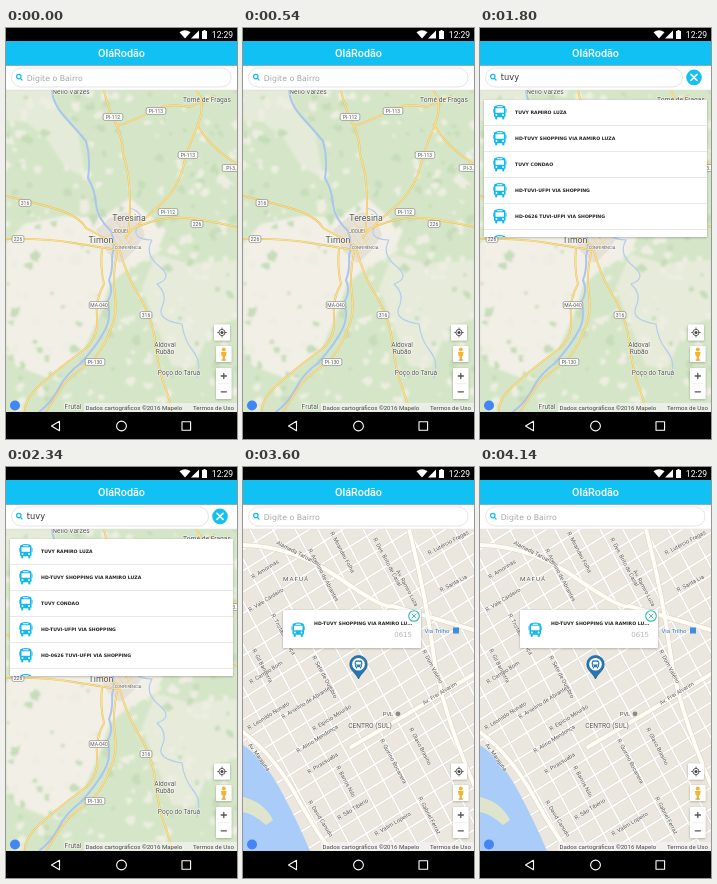
Recreate the animation shown at these times as an HTML page. Size 231 by 411 pixels, loop 4500 ms.

```html
<!DOCTYPE html>
<html lang="pt">
<head>
<meta charset="utf-8">
<title>Linhas de ônibus</title>
<style>
html, body { margin: 0; width: 100%; height: 100%; overflow: hidden; background: #000; }
svg { display: block; width: 100%; height: 100%; }
text { font-family: Roboto, Arial, sans-serif; }
.wide { font-family: "DejaVu Sans", Verdana, sans-serif; }
.row { font: bold 4.65px "DejaVu Sans", Verdana, sans-serif; fill: #222; }
.place { fill: #55534e; paint-order: stroke; stroke: #fffc; stroke-width: 1.2px; stroke-linejoin: round; }
.street { font-size: 5.7px; fill: #55524d; paint-order: stroke; stroke: #fffb; stroke-width: 1px; }
.line { fill: none; stroke-linecap: round; stroke-linejoin: round; }
.city, .zoom, .all, .found, .picked, .idle, .typed { animation: 4500ms step-end infinite; }
.city { animation-name: city; }
.zoom { animation-name: zoom; }
.all { animation-name: all; }
.found, .typed { animation-name: found; }
.idle { animation-name: idle; }
.picked { animation-name: picked; }
@keyframes city { 0% { opacity: 1 } 80%, 100% { opacity: 0 } }
@keyframes zoom { 0% { opacity: 0 } 80%, 100% { opacity: 1 } }
@keyframes all { 0% { opacity: 0 } 20% { opacity: 1 } 40%, 100% { opacity: 0 } }
@keyframes found { 0% { opacity: 0 } 40% { opacity: 1 } 80%, 100% { opacity: 0 } }
@keyframes idle { 0% { opacity: 1 } 40% { opacity: 0 } 80%, 100% { opacity: 1 } }
@keyframes picked { 0% { opacity: 0 } 60% { opacity: 1 } 80%, 100% { opacity: 0 } }
</style>
</head>
<body>
<svg viewBox="0 0 231 411" preserveAspectRatio="none">
  <defs>
    <clipPath id="map"><rect y="62" width="231" height="322"/></clipPath>
    <clipPath id="panel"><rect x="4" y="72" width="223" height="137"/></clipPath>
    <filter id="shade" x="-10%" y="-10%" width="120%" height="130%">
      <feDropShadow dx="0" dy=".7" stdDeviation=".9" flood-opacity=".28"/>
    </filter>
    <filter id="soft"><feGaussianBlur stdDeviation="1"/></filter>
    <symbol id="bus" viewBox="0 0 14 15" overflow="visible">
      <path fill="currentColor" d="M2 1Q7-1 12 1Q13 1.5 13 3V12.2H11.8V14Q11.8 15 10.7 15T9.6 14V12.7H4.4V14Q4.4 15 3.3 15T2.2 14V12.2H1V3Q1 1.5 2 1ZM0 4H.7V8H0ZM13.3 4H14V8H13.3Z"/>
      <path fill="#fff" d="M4.3 1.4H9.7V2.3H4.3ZM2.6 3.4H11.4V7.9H2.6Z"/>
      <circle cx="3.6" cy="10.4" r="1" fill="#fff"/><circle cx="10.4" cy="10.4" r="1" fill="#fff"/>
    </symbol>
  </defs>

  <g clip-path="url(#map)">
    <g class="city" id="city"></g>
    <g class="zoom" id="zoom"></g>
    <path d="M78 375H231V384H78Z" fill="#f5f5f5" opacity=".68"/>
    <g font-size="6.1" fill="#444">
      <text x="79.5" y="382.3">Dados cartográficos ©2016 Mapelo</text>
      <text x="187" y="382.3">Termos de Uso</text>
    </g>
    <circle cx="9" cy="377.5" r="5" fill="#4285f4"/>
    <g filter="url(#shade)" fill="#fff">
      <rect x="208" y="296.5" width="16" height="16" rx="1"/>
      <rect x="210" y="318" width="15.5" height="16" rx="1"/>
      <rect x="210" y="340" width="15.5" height="31" rx="1"/>
    </g>
    <g class="line" stroke="#555">
      <circle cx="216" cy="304.5" r="3.1"/>
      <path d="M216 300V301M216 308V309M211.7 304.5H212.7M219.3 304.5H220.3" stroke-width=".9"/>
      <path d="M215.2 348H220.4M217.8 345.4V350.6M215.2 363.8H220.4" stroke-width="1.3"/>
      <path d="M212.5 355.7H223" stroke="#e4e4e4" stroke-width=".6"/>
    </g>
    <circle cx="216" cy="304.5" r="1.5" fill="#444"/>
    <circle cx="217.8" cy="321.6" r="2" fill="#f6b330"/>
    <path d="M215 324H220.6L220 328H219.2L218.8 331.6H216.8L216.4 328H215.5Z" fill="#f6b330"/>
    <ellipse cx="217.8" cy="332" rx="2.6" ry=".7" fill="#c49a45"/>
  </g>

  <g class="all" id="all"></g>
  <g class="found" id="found"></g>

  <g class="zoom">
    <rect x="40" y="143" width="138" height="38" rx="1" fill="#fff" filter="url(#shade)"/>
    <use href="#bus" x="48.5" y="155.5" width="13.5" height="14.5" color="#11b9ee"/>
    <text class="row" x="71" y="158">HD-TUVY SHOPPING VIA RAMIRO LU...</text>
    <text class="wide" x="169" y="170" text-anchor="end" font-size="7" fill="#b5b5b5">0615</text>
    <circle cx="171" cy="149" r="5.3" fill="#fff" stroke="#35b8ae" stroke-width="1.1"/>
    <path class="line" d="M169 147L173 151M173 147L169 151" stroke="#35b8ae" stroke-width=".9"/>
    <path d="M115.5 212C113 206 106.8 203.5 106.8 197.2A8.7 8.7 0 0 1 124.2 197.2C124.2 203.5 118 206 115.5 212Z" fill="#2477b3" stroke="#17598c" stroke-width=".7"/>
    <circle cx="115.5" cy="197.2" r="6.3" fill="#fff"/>
    <use href="#bus" x="111.5" y="193" width="8" height="8.5" color="#2477b3"/>
  </g>

  <rect width="231" height="13" fill="#000"/>
  <rect y="13" width="231" height="24.5" fill="#11c1f3"/>
  <rect y="37.5" width="231" height="24.5" fill="#fff"/>
  <path d="M0 62H231" stroke="#ddd" stroke-width=".5"/>
  <text x="115.5" y="28.6" text-anchor="middle" font-size="10.8" font-weight="500" fill="#fff">OláRodão</text>

  <g class="idle">
    <rect x="5.5" y="40" width="219.5" height="19" rx="9.5" fill="#fff" stroke="#ddd" stroke-width=".8"/>
    <text class="wide" x="20.8" y="52.6" font-size="7.8" fill="#a4a4a4">Digite o Bairro</text>
  </g>
  <g class="typed">
    <rect x="5.5" y="40" width="197" height="19" rx="9.5" fill="#fff" stroke="#ddd" stroke-width=".8"/>
    <text class="wide" x="20.8" y="52.4" font-size="8.3" fill="#333">tuvy</text>
    <circle cx="214" cy="49.4" r="7.8" fill="#11c1f3"/>
    <path class="line" d="M211 46.4L217 52.4M217 46.4L211 52.4" stroke="#fff" stroke-width="1.6"/>
  </g>
  <g class="line" stroke="#11b9ee" stroke-width="1.2">
    <circle cx="12.8" cy="48.6" r="2.2"/><path d="M14.5 50.4L16 52"/>
  </g>

  <g fill="#fff">
    <path d="M173.5 4.2Q179 .5 184.5 4.2L179 10.6Z"/>
    <path d="M185 10.5H193V2.5Z"/>
    <path d="M196 3H197.5V2H199.5V3H201V11H196Z"/>
    <text x="205.8" y="9.8" font-size="8.6">12:29</text>
  </g>

  <rect y="384.5" width="231" height="26.5" fill="#000"/>
  <g class="line" stroke="#fff" stroke-width="1.1">
    <path d="M45.5 398L53.5 393.3V402.7Z"/>
    <circle cx="115.5" cy="398" r="4.9"/>
    <rect x="176" y="393.7" width="8.6" height="8.6"/>
  </g>
</svg>
<script>
const put = (id, parts) => { document.getElementById(id).innerHTML = parts.flat().join(''); };
const line = (d, color, width) => `<path class="line" d="${d}" stroke="${color}" stroke-width="${width}"/>`;
const fill = (d, color) => `<path d="${d}" fill="${color}"/>`;
const place = (s, x, y, size, extra = '') =>
  `<text class="place" text-anchor="middle" x="${x}" y="${y}" font-size="${size}" ${extra}>${s}</text>`;
const street = ([s, x, y, turn]) =>
  `<text class="street" transform="translate(${x} ${y}) rotate(${turn})">${s}</text>`;

let seed = 17;
const rnd = () => (seed = (seed * 16807) % 2147483647) / 2147483647;

// Regional map
function blob(color, x, y, r) {
  const pts = Array.from({ length: 8 }, (_, i) => {
    const a = i * Math.PI / 4, k = r * (0.45 + rnd());
    return `${(x + k * Math.cos(a)).toFixed(1)} ${(y + k * Math.sin(a)).toFixed(1)}`;
  });
  return fill(`M${pts.join('L')}Z`, color);
}
const speckle = (n, color, size) => Array.from({ length: n }, () =>
  blob(color, rnd() * 231, 62 + rnd() * 322, 1 + rnd() * size));

function badge(s, x, y) {
  const w = s.length * 2.6 + 4;
  return `<rect x="${x - w / 2}" y="${y - 3.4}" width="${w}" height="6.8" rx="1.5" fill="#fff" stroke="#77766f" stroke-width=".6"/>
    <text x="${x}" y="${y + 1.8}" text-anchor="middle" font-size="5" fill="#555">${s}</text>`;
}

const rivers = [
  'M46 62Q47 76 58 88T80 113Q85 130 82 150Q89 162 90 176T105 203Q110 216 106 228Q107 242 103 252Q108 264 101 274Q106 288 99 302T75 335Q60 346 53 360T33 384',
];
const creek = 'M124 180Q140 185 132 198T146 212Q138 226 153 238T151 256Q162 266 156 279T176 296Q178 312 187 323T191 350';
const roads = [
  'M98 62Q101 78 109 94T117 126Q124 146 124 174T120 210',
  'M111 98Q130 92 146 83T184 79L208 68',
  'M190 62Q201 75 191 99T179 132Q173 160 155 176T122 206',
  'M191 96Q203 119 231 136',
  'M0 168Q27 174 50 181T80 200L113 218',
  'M0 211Q38 210 68 215T112 222',
  'M122 203Q144 192 164 190T231 199',
  'M113 220Q121 249 132 266T148 305Q152 340 158 356T166 384',
  'M96 220Q94 240 98 256Q89 271 91 291T75 324Q48 344 33 358T19 384',
  'M111 225Q106 248 109 267T104 303Q94 329 78 339T52 365L40 384',
];

put('city', [
  fill('M0 62H231V384H0Z', '#d5e6c8'),
  '<g filter="url(#soft)">',
  fill('M0 62H47L52 82L72 104L80 150L60 140L40 110L20 94L0 92Z', '#e4ebd8'),
  fill('M18 196L58 188L96 190L124 170L142 186L160 202L150 226L120 242L104 256L94 286L78 322L42 350L10 338L0 316V216Z', '#f1efe6'),
  fill('M150 226L184 236L231 232V290L205 300L188 340L166 338L150 296L136 260Z', '#e6ebda'),
  speckle(190, '#edeee1', 4.3),
  speckle(110, '#c7ddba', 4),
  '</g>',
  fill('M90 202L104 190L120 184L134 193L139 207L127 224L114 235L101 224Z', '#e6e1d8'),
  rivers.map(d => line(d, '#a9c6ef', 2)),
  line(creek, '#b3cdee', 1.2),
  roads.map(d => line(d, '#e3bd62', 1.9)),
  roads.map(d => line(d, '#fbe08d', 1.2)),
  ['M98 210L118 199L126 211L113 222Z', 'M104 198L119 219', 'M111 194L124 216'].map(d => line(d, '#f5d781', 0.8)),
  badge('PI-112', 107, 89), badge('PI-113', 150, 83), badge('PI-113', 182, 127),
  badge('PI-3..', 226, 140), badge('PI-112', 162, 184), badge('316', 19, 175),
  badge('226', 12, 211), badge('226', 191, 196), badge('316', 140, 287),
  badge('MA-040', 93, 277), badge('PI-130', 89, 334),
  place('Nélio Varzes', 65, 66, 6.7),
  place('Tomé de Fragas', 201, 74, 6.7),
  place('Teresina', 123, 193, 8.8),
  place('Timon', 95, 215, 8.8),
  place('JÓQUEI', 114, 205, 4.6),
  place('CONFERÊNCIA', 122, 221, 4),
  place('Aldoval', 159, 318.5, 6.6), place('Rubão', 159, 325.5, 6.6),
  place('Poço do Taruá', 173, 347, 6.6),
  place('Frutal', 67, 381, 6.6),
]);

// Street map
const grid = (count, gap, turn, color, width) => `<g transform="translate(115 223) rotate(${turn})">` +
  Array.from({ length: count }, (_, i) => {
    const y = (i - (count - 1) / 2) * gap;
    return line(`M-240 ${y}H240`, color, width);
  }).join('') + '</g>';
const avenues = [
  'M0 78Q50 79 96 111T149 139L231 163',
  'M108 280Q167 246 231 207',
  'M0 265Q30 287 54 330T89 384',
  'M166 62Q183 130 190 184T231 318',
];
const names = [
  ['Alameda Taruanã', 33, 77, 27], ['R. Amorinas', 10, 112, -32],
  ['R. Mirandeu Folha', 87, 66, 62], ['R. Lutércio Fragas', 186, 88, -28],
  ['R. Vale Cardeiro', 7, 145, -32], ['R. Des. Brito de Casal', 130, 72, 62],
  ['R. Arvelino de Abrantes', 65, 83, 62], ['Av. Ramiro Luza', 153, 104, 62],
  ['R. Gil Bandurra', 9, 183, 62], ['R. Sete de Outubro', 69, 190, 62],
  ['R. Tristão Valença', 28, 148, 62], ['R. Campo Bom', 8, 217, -32],
  ['R. Leonildo Nonato', 6, 263, -32], ['R. Arvelino de Abrantes', 40, 252, -32],
  ['R. Elpício Mourão', 71, 264, -32], ['R. Alírio Mendonça', 55, 286, -32],
  ['R. Pirassuaba', 66, 307, -32], ['Av. Marajuna', 5, 278, 54],
  ['R. Quirino Bocanera', 137, 273, 62], ['Av. Frei Alvarim', 181, 238, -31],
  ['R. São Tibério', 96, 353, -32], ['R. Barros Nilo', 93, 300, 62],
  ['R. Dom Valério', 179, 184, 62], ['R. Olavo Brasino', 166, 262, 62],
  ['R. Valim Lopeiro', 133, 369, -31], ['R. David Canudo', 65, 335, 58],
  ['R. Gabriel Ferraz', 175, 331, 62], ['R. Santa Lia', 198, 125, -28],
];

put('zoom', [
  fill('M0 62H231V384H0Z', '#ebe7de'),
  grid(27, 18, -32, '#d9d5cc', 2.4), grid(23, 20, 62, '#d9d5cc', 2.4),
  grid(27, 18, -32, '#fff', 1.7), grid(23, 20, 62, '#fff', 1.7),
  fill('M0 278Q20 291 37 322T67 384H0Z', '#a9cdf8'),
  fill('M0 330Q21 335 30 353L23 358Q11 347 0 345Z', '#dfe5cc'),
  avenues.map(d => line(d, '#d8d2c5', 5)),
  avenues.map(d => line(d, '#fffdf5', 4)),
  names.map(street),
  place('MAFUÁ', 53, 114, 6.2, 'letter-spacing="1"'),
  place('CENTRO (SUL)', 127, 261, 6.7),
  place('PVL', 145, 249, 5.8),
  '<circle cx="155" cy="246.8" r="2.4" fill="#8b8a85"/>',
  place('Via Trilho', 194, 165.5, 6, 'style="fill:#3b6fb5"'),
  '<rect x="210" y="160.5" width="6" height="6" fill="#3d8fdb"/>',
]);

// Result lists
function list(rows, mark = '') {
  const top = i => 71.5 + 26 * i;
  return ['<rect x="4" y="72" width="223" height="137" fill="#fff" filter="url(#shade)"/>',
    '<g clip-path="url(#panel)">', mark,
    rows.map((s, i) => `<use href="#bus" x="13" y="${top(i) + 5.5}" width="13.5" height="14.5" color="#11b9ee"/>
      <text class="row" x="35" y="${top(i) + 14.2}">${s}</text>
      <path d="M4 ${top(i + 1)}H227" stroke="#d9d9d9" stroke-width=".6"/>`),
    `<use href="#bus" x="13" y="${top(5) + 5.5}" width="13.5" height="14.5" color="#11b9ee"/></g>`].flat();
}
put('all', list([
  'MUTA NOVO B. ALEGRANCA VIA TUMIRIM',
  'VILA CARPINTEIRO-CHAPADAO URUPA DOM ALVARIM',
  'V CARPINTEIRO-COMETA VIA SHOPPING',
  'VILA CARPINTEIRO PADRE OLIVO',
  'CHAPADAO TAMUNHI VIA AV. TURFE CLUB',
]));
put('found', list([
  'TUVY RAMIRO LUZA',
  'HD-TUVY SHOPPING VIA RAMIRO LUZA',
  'TUVY CONDAO',
  'HD-TUVI-UFPI VIA SHOPPING',
  'HD-0626 TUVI-UFPI VIA SHOPPING',
], '<rect class="picked" x="4" y="97.5" width="223" height="26" fill="#d4d4d4"/>'));
</script>
</body>
</html>
```
